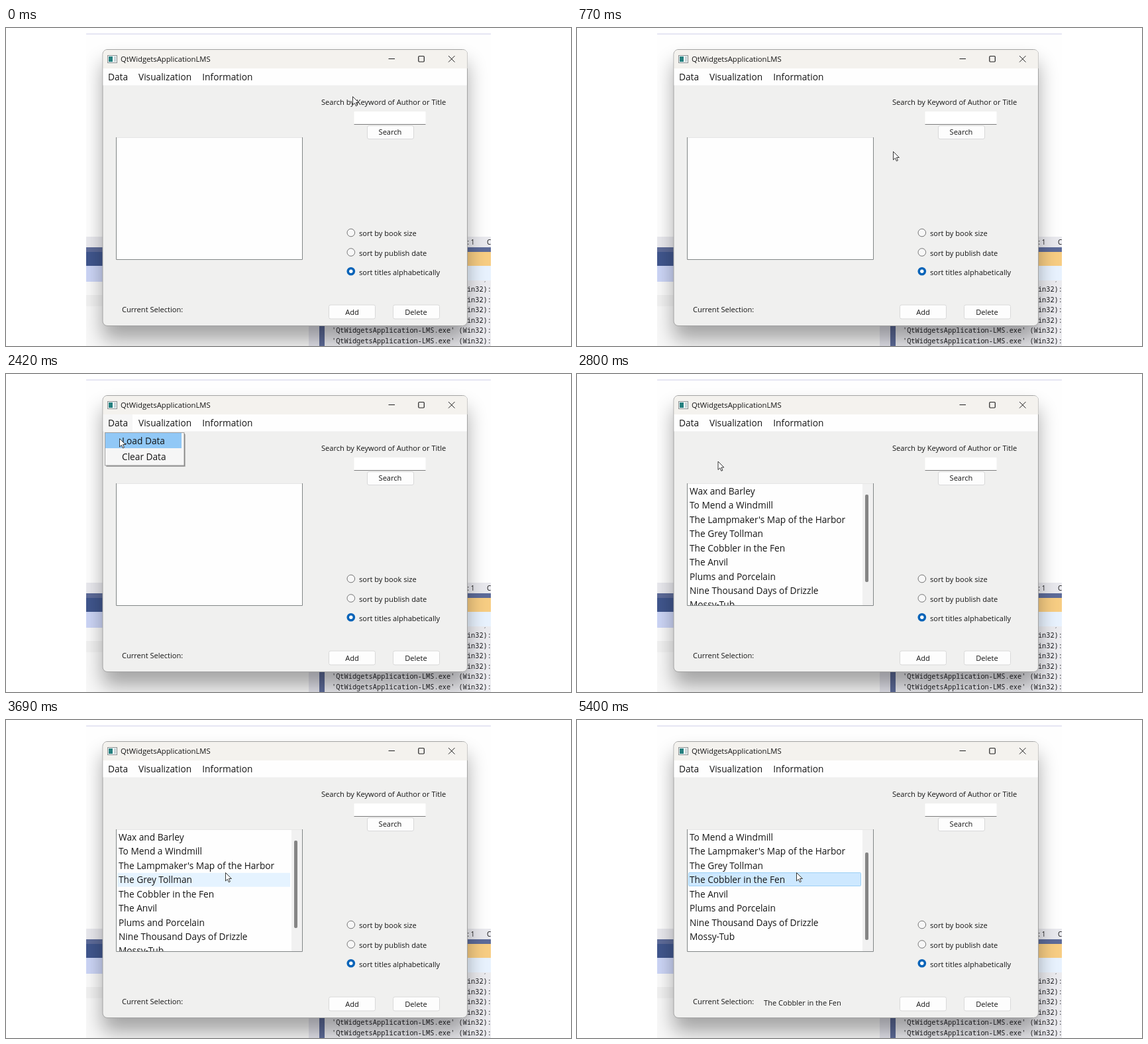
An HTML page that plays this animation: 853 by 480 pixels, repeating every 8000 ms.

```html
<!DOCTYPE html>
<html lang="en">
<head>
<meta charset="utf-8">
<title>Library window</title>
<style>
  html, body { margin: 0; width: 100%; height: 100%; overflow: hidden; background: #fff; }
  svg { display: block; width: 100%; height: 100%; }
  text { font: 11.08px "Open Sans", "Noto Sans", sans-serif; fill: #151515; white-space: pre; }
  .big text, text.big { font-size: 13.7px; }
  .mid { text-anchor: middle; }
  #log text { font: 10.3px "Noto Sans Mono", "DejaVu Sans Mono", monospace; fill: #1a1a1d; }
  .button { fill: #fdfdfd; stroke: #d9d9d9; }
  .glyph { fill: none; stroke: #222; }
</style>
</head>
<body>
<svg viewBox="0 0 853 480">
  <defs>
    <clipPath id="screen"><rect x="121" y="8" width="611" height="472"/></clipPath>
    <clipPath id="logArea"><rect x="481" y="382.5" width="251" height="98"/></clipPath>
    <clipPath id="listArea"><rect x="167" y="166" width="280" height="183"/></clipPath>
    <filter id="blur" x="-20%" y="-20%" width="140%" height="140%"><feGaussianBlur stdDeviation="15"/></filter>
  </defs>

  <g clip-path="url(#screen)">
    <rect x="121" y="8" width="611" height="472" fill="#fefefe"/>
    <rect x="121" y="8" width="611" height="2" fill="#e6e6f3"/>
    <rect x="121" y="315" width="611" height="16" fill="#e9e9ee"/>
    <rect x="121" y="331" width="611" height="7" fill="#5d6b99"/>
    <rect x="121" y="338" width="340" height="21" fill="#40568d"/>
    <rect x="461" y="338" width="271" height="21" fill="#f7cd83"/>
    <rect x="121" y="359" width="340" height="24" fill="#ccd5f6"/>
    <rect x="461" y="359" width="271" height="22" fill="#e8f2fe"/>
    <rect x="121" y="383" width="340" height="20" fill="#fafafa"/>
    <rect x="121" y="403" width="340" height="17" fill="#f1f1f1"/>
    <rect x="121" y="420" width="340" height="60" fill="#f8f8f8"/>
    <rect x="457" y="383" width="16" height="97" fill="#e2e2ea"/>
    <rect x="473" y="381" width="8" height="99" fill="#5d6b99"/>
    <rect x="481" y="381" width="251" height="99" fill="#ebebef"/>
    <rect x="146" y="52" width="550" height="418" rx="7" opacity=".34" filter="url(#blur)"/>
    <text x="696.5" y="327" style="font-size:10px">: 1</text>
    <text x="726" y="327" style="font-size:10px">Col</text>
    <g id="log" clip-path="url(#logArea)"></g>
  </g>

  <rect x="146" y="32.5" width="550.5" height="417" rx="7" fill="#f0f0ef" stroke="#a3a3a3"/>
  <path d="M146.5 61V40q0-7 7-7h536q7 0 7 7v21z" fill="#f4f2ee"/>
  <rect x="146.5" y="61" width="549.5" height="25.5" fill="#fefefe"/>

  <rect x="153.5" y="41.5" width="14" height="11" fill="#f4f8f8" stroke="#8a9092"/>
  <rect x="155" y="43" width="6" height="8" fill="#26807f"/>
  <rect x="163" y="43" width="3" height="8" fill="#c5d2d5"/>
  <text x="173" y="51" style="font-size:11.25px">QtWidgetsApplicationLMS</text>
  <path class="glyph" d="M577.5 46.5h9.5M668 42l9.5 9.5M677.5 42l-9.5 9.5"/>
  <rect class="glyph" x="622.8" y="42.5" width="8.5" height="8.5" rx="1.2" stroke-width="1.2"/>

  <rect id="dataHover" x="147" y="61" width="44" height="25.5" fill="#f6f6f6"/>
  <g class="big">
    <text x="154" y="79">Data</text>
    <text x="200" y="79">Visualization</text>
    <text x="296.3" y="79">Information</text>
  </g>

  <text x="476" y="116">Search by Keyword of Author or Title</text>
  <rect x="525.5" y="126" width="108" height="20" rx="1" fill="#fff"/>
  <path d="M525.5 145.5h108" stroke="#7d7d7d"/>
  <rect class="button" x="545.5" y="147.5" width="70" height="20" rx="2.5"/>
  <text class="mid" x="580" y="161">Search</text>

  <rect x="166" y="165" width="282" height="185" fill="#fefefe"/>
  <path d="M166 165.5h282" stroke="#e6e6e6"/>
  <path d="M166.5 165v184.5h281v-184.5" fill="none" stroke="#828687"/>
  <g id="books" class="big" clip-path="url(#listArea)">
    <rect id="hover" x="168" width="261" height="21" fill="#e5f3ff"/>
    <rect id="picked" x="168.5" width="260" height="20" rx="1" fill="#cde8ff" stroke="#9bcff5"/>
    <g id="rows"></g>
    <rect x="431" y="166" width="16" height="183" fill="#f1f1f1"/>
    <rect id="thumb" x="435" width="5" height="132" rx="2" fill="#858585"/>
  </g>

  <g fill="#f7f7f7" stroke="#767676">
    <circle cx="520.8" cy="309" r="5.8"/>
    <circle cx="520.8" cy="338.5" r="5.8"/>
  </g>
  <circle cx="520.8" cy="367.2" r="6.3" fill="#0763b8"/>
  <circle cx="520.8" cy="367.2" r="2.7" fill="#fff"/>
  <text x="533" y="314">sort by book size</text>
  <text x="533" y="343.5">sort by publish date</text>
  <text x="533" y="372.5">sort titles alphabetically</text>

  <text x="175" y="429">Current Selection:</text>
  <text id="choice" x="282" y="430.5"></text>
  <rect class="button" x="487.5" y="418" width="70" height="21" rx="2.5"/>
  <rect class="button" x="584.5" y="418" width="70" height="21" rx="2.5"/>
  <text class="mid" x="522.5" y="433">Add</text>
  <text class="mid" x="619" y="433">Delete</text>

  <g id="menu">
    <rect x="152" y="91" width="119" height="49" fill="#000" opacity=".22"/>
    <rect x="149.5" y="88.5" width="119.5" height="49.5" fill="#f6f6f6" stroke="#a0a0a0"/>
    <path d="M269.5 90v49H151" fill="none" stroke="#858585"/>
    <rect id="loadHover" x="150" y="89" width="115" height="23" fill="#91c8f6"/>
    <text class="big" x="175" y="106">Load Data</text>
    <text class="big" x="175" y="130">Clear Data</text>
  </g>

  <path id="cursor" d="M-.5-.5V12l2.9-2.7 2 4.5 2-.9-2-4.4h4z" fill="#fff" stroke="#222" stroke-width=".9"/>
</svg>

<script>
  const $ = id => document.getElementById(id);
  const LOOP = 8000, ROW = 21.43, TOP = 166;
  const MENU_OPEN = 2040, LOADED = 2610, SCROLLED = 3690, PICKED = 4070, PICK = 4;
  const titles = [
    "Wax and Barley", "To Mend a Windmill", "The Lampmaker's Map of the Harbor",
    "The Grey Tollman", "The Cobbler in the Fen", "The Anvil", "Plums and Porcelain",
    "Nine Thousand Days of Drizzle", "Mossy-Tub"
  ];
  // time, x, y of the pointer tip
  const path = [
    [140, 524, 104], [770, 478, 187], [960, 478, 187], [1530, 166, 75],
    [1910, 166, 75], [2290, 172, 98], [2610, 172, 98], [3180, 332, 231]
  ];

  function addText(parent, x, y, string) {
    const el = document.createElementNS("http://www.w3.org/2000/svg", "text");
    el.setAttribute("x", x);
    el.setAttribute("y", y);
    el.textContent = string;
    parent.append(el);
  }
  titles.forEach((title, i) => addText($("rows"), 170, 182 + i * ROW, title));
  for (let i = 0; i < 7; i++) {
    addText($("log"), 492, 382.3 + i * 15.6, "'QtWidgetsApplication-LMS.exe' (Win32):");
  }
  $("choice").textContent = titles[PICK];

  const show = (id, on) => $(id).style.display = on ? "" : "none";
  const ease = p => p * p * (3 - 2 * p);

  function snap(t) {
    if (t < 200) return 0;
    const rest = (t - 200) % 190;
    return t - rest + (rest >= 130 ? 130 : 0);
  }

  function pointer(t) {
    if (t <= path[0][0]) return path[0].slice(1);
    const next = path.findIndex(key => key[0] > t);
    if (next < 0) return path[path.length - 1].slice(1);
    const [t0, x0, y0] = path[next - 1], [t1, x1, y1] = path[next];
    const p = ease((t - t0) / (t1 - t0));
    return [x0 + (x1 - x0) * p, y0 + (y1 - y0) * p];
  }

  function draw(time) {
    const t = snap(time), [x, y] = pointer(t);
    const loaded = t >= LOADED, picked = t >= PICKED;
    const scroll = t >= SCROLLED ? 1 : 0;
    const open = t >= MENU_OPEN && !loaded;
    const row = Math.floor((y - TOP) / ROW);

    $("cursor").setAttribute("transform", `translate(${x.toFixed(1)} ${y.toFixed(1)})`);
    show("dataHover", open || (x < 191 && y > 61 && y < 86));
    show("menu", open);
    show("loadHover", y >= 89);
    show("books", loaded);
    show("hover", !picked && row >= 0 && x > 168 && x < 429);
    $("hover").setAttribute("y", TOP + .5 + row * ROW);
    show("picked", picked);
    $("picked").setAttribute("y", TOP + .2 + (PICK - scroll) * ROW);
    show("choice", picked);
    $("rows").setAttribute("transform", `translate(0 ${-scroll * ROW})`);
    $("thumb").setAttribute("y", 182 + scroll * 18);
  }

  function tick() {
    draw(performance.now() % LOOP);
    requestAnimationFrame(tick);
  }
  tick();
</script>
</body>
</html>
```
